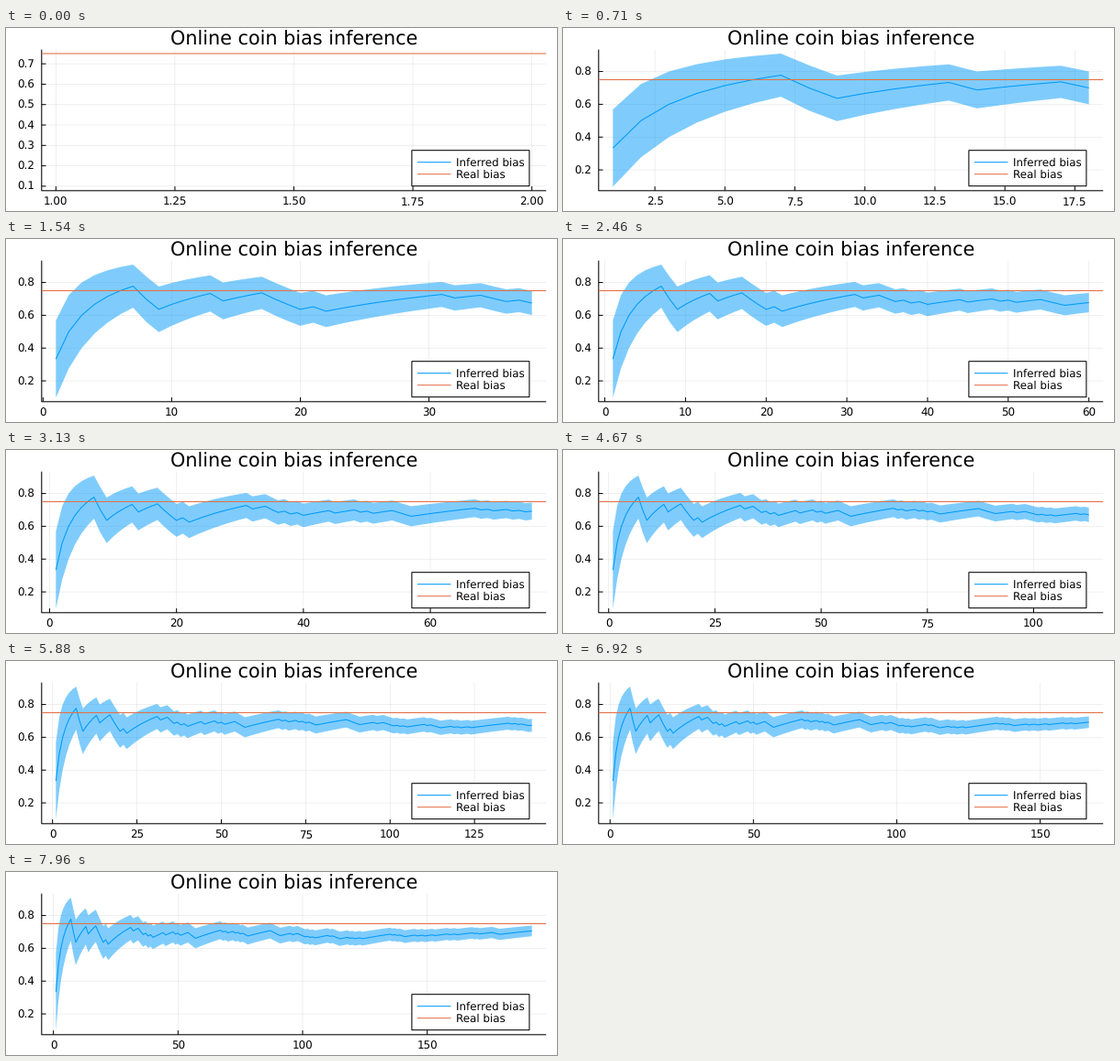
A matplotlib script that plays this animation: 600 px wide and 200 px high, repeating every 8000 ms.

```python
import math

import matplotlib.pyplot as plt
import numpy as np
from matplotlib.animation import FuncAnimation
from matplotlib.collections import LineCollection
from matplotlib.patches import Polygon, Rectangle

W, H, DPI = 600, 200, 100
STEP_MS, LOOP_MS, FPS = 20, 8000, 24
PT = 72 / DPI  # points per pixel

LEFT, RIGHT, TOP, BOTTOM = 38.8, 588.2, 23.6, 177.8
BLUE, ORANGE = "#009afa", "#e36f47"
TEXT, TITLE = 11.9 * PT, 20.8 * PT
REAL_BIAS = 0.75

plt.rcParams["font.family"] = "DejaVu Sans"
plt.rcParams["text.hinting"] = "none"

# Coin flips that came up tails; all others are heads.
TAILS = [1, 8, 9, 14, 18, 19, 20, 22, 32, 35, 36, 38, 40, 45, 49, 51,
         55, 56, 57, 68, 70, 73, 75, 77, 78, 88, 89, 90, 91, 96, 99, 100,
         101, 103, 105, 111, 113, 114, 115, 119, 121, 124, 136, 138, 140,
         141, 146, 149, 153, 159, 162, 169, 171, 177, 178, 179]
FLIPS = LOOP_MS * FPS // 1000

# Beta posterior after each flip, starting from Beta(1, 1).
flip = np.arange(1, FLIPS + 1)
b = 1 + np.cumsum(np.isin(flip, TAILS))
a = flip + 2 - b
mean = a / (a + b)
std = np.sqrt(a * b / ((a + b) ** 2 * (a + b + 1)))
low, high = mean - std, mean + std

NICE = [(5, 0.9), (3, 0.2), (2.5, 0.5), (2, 0.7), (1, 1.0)]


def nice_ticks(lo, hi):
    """Pick 4 to 8 round ticks, weighing count, coverage and niceness."""
    span = hi - lo
    top = math.ceil(math.log10(span))
    best, choice = -1, None
    for z in range(top, top - 4, -1):
        for q, score in NICE:
            step = q * 10.0 ** z
            first = math.ceil(lo / step - 1e-9)
            last = math.floor(hi / step + 1e-9)
            count = last - first + 1
            if not 4 <= count <= 8:
                continue
            total = (0.25 * (1 - abs(count - 5) / 5)
                     + 0.5 * span / ((count - 1) * step) + 0.25 * score)
            if total > best + 1e-9:
                best, choice = total, (first, last, step)
    first, last, step = choice
    digits = next(d for d in range(6) if abs(round(step, d) - step) < 1e-9)
    values = [i * step for i in range(first, last + 1)]
    return values, [f"{v:.{digits}f}" for v in values]


def widen(lo, hi):
    pad = 0.03 * (hi - lo)
    return lo - pad, hi + pad


fig = plt.figure(figsize=(W / DPI, H / DPI), dpi=DPI, facecolor="white")
ax = fig.add_axes([0, 0, 1, 1])
ax.set_xlim(0, W)
ax.set_ylim(H, 0)
ax.axis("off")


def segments(color, width, z, alpha=1):
    lines = LineCollection([], colors=color, linewidths=width * PT,
                           alpha=alpha, zorder=z, capstyle="butt",
                           snap=False)
    return ax.add_collection(lines, autolim=False)


def stroke(xs, ys, color, z, width=1.05):
    return ax.plot(xs, ys, color=color, lw=width * PT, zorder=z, snap=False,
                   solid_capstyle="butt", solid_joinstyle="round")[0]


def label(x, y, s="", size=TEXT, ha="center"):
    return ax.text(x, y, s, size=size, ha=ha, va="baseline", zorder=8)


grid = segments("black", 0.6, 1, 0.1)
ticks = segments("black", 1, 2)
stroke([LEFT, LEFT, RIGHT], [TOP, BOTTOM, BOTTOM], "black", 2)
band = ax.add_patch(Polygon(np.zeros((3, 2)), fc=BLUE, ec="none",
                            alpha=0.5, zorder=3, snap=False))
curve = stroke([], [], BLUE, 4)
bias = stroke([LEFT, RIGHT], [0, 0], ORANGE, 5)
x_labels = [label(0, 193.6) for _ in range(8)]
y_labels = [label(31.3, 0, ha="right") for _ in range(8)]

label((LEFT + RIGHT) / 2, 18.4, "Online coin bias inference", TITLE)
ax.add_patch(Rectangle((441.9, 133.7), 128, 39, fc="white", ec="black",
                       lw=1.05 * PT, zorder=6, snap=False))
for y, color, name in [(146.7, BLUE, "Inferred bias"),
                       (159.7, ORANGE, "Real bias")]:
    stroke([448, 484.5], [y, y], color, 7)
    label(489.5, y + 4.5, name, ha="left")


def update(i):
    n = int((i * STEP_MS + STEP_MS / 2 + 5) * FPS / 1000) + 1
    x0, x1 = widen(1, max(n, 2))
    y0, y1 = widen(low[:n].min(), max(high[:n].max(), REAL_BIAS))

    def px(x):
        return LEFT + (x - x0) / (x1 - x0) * (RIGHT - LEFT)

    def py(y):
        return BOTTOM - (y - y0) / (y1 - y0) * (BOTTOM - TOP)

    xs = px(flip[:n])
    curve.set_data(xs, py(mean[:n]))
    band.set_xy(np.column_stack([np.r_[xs, xs[::-1]],
                                 np.r_[py(low[:n]), py(high[:n])[::-1]]]))
    band.set_visible(n > 1)
    curve.set_visible(n > 1)
    bias.set_ydata([py(REAL_BIAS)] * 2)

    xv, xt = nice_ticks(x0, x1)
    yv, yt = nice_ticks(y0, y1)
    xp, yp = [px(v) for v in xv], [py(v) for v in yv]
    grid.set_segments([[(x, TOP), (x, BOTTOM)] for x in xp]
                      + [[(LEFT, y), (RIGHT, y)] for y in yp])
    ticks.set_segments([[(x, BOTTOM), (x, BOTTOM - 4.7)] for x in xp]
                       + [[(LEFT, y), (LEFT + 4.7, y)] for y in yp])
    for j in range(8):
        x_labels[j].set_text(xt[j] if j < len(xt) else "")
        y_labels[j].set_text(yt[j] if j < len(yt) else "")
        if j < len(xp):
            x_labels[j].set_x(xp[j])
        if j < len(yp):
            y_labels[j].set_y(yp[j] + 4.4)
    return []


anim = FuncAnimation(fig, update, frames=LOOP_MS // STEP_MS,
                     interval=STEP_MS, init_func=lambda: update(0),
                     repeat=True, repeat_delay=0, blit=False)
plt.show()
```
